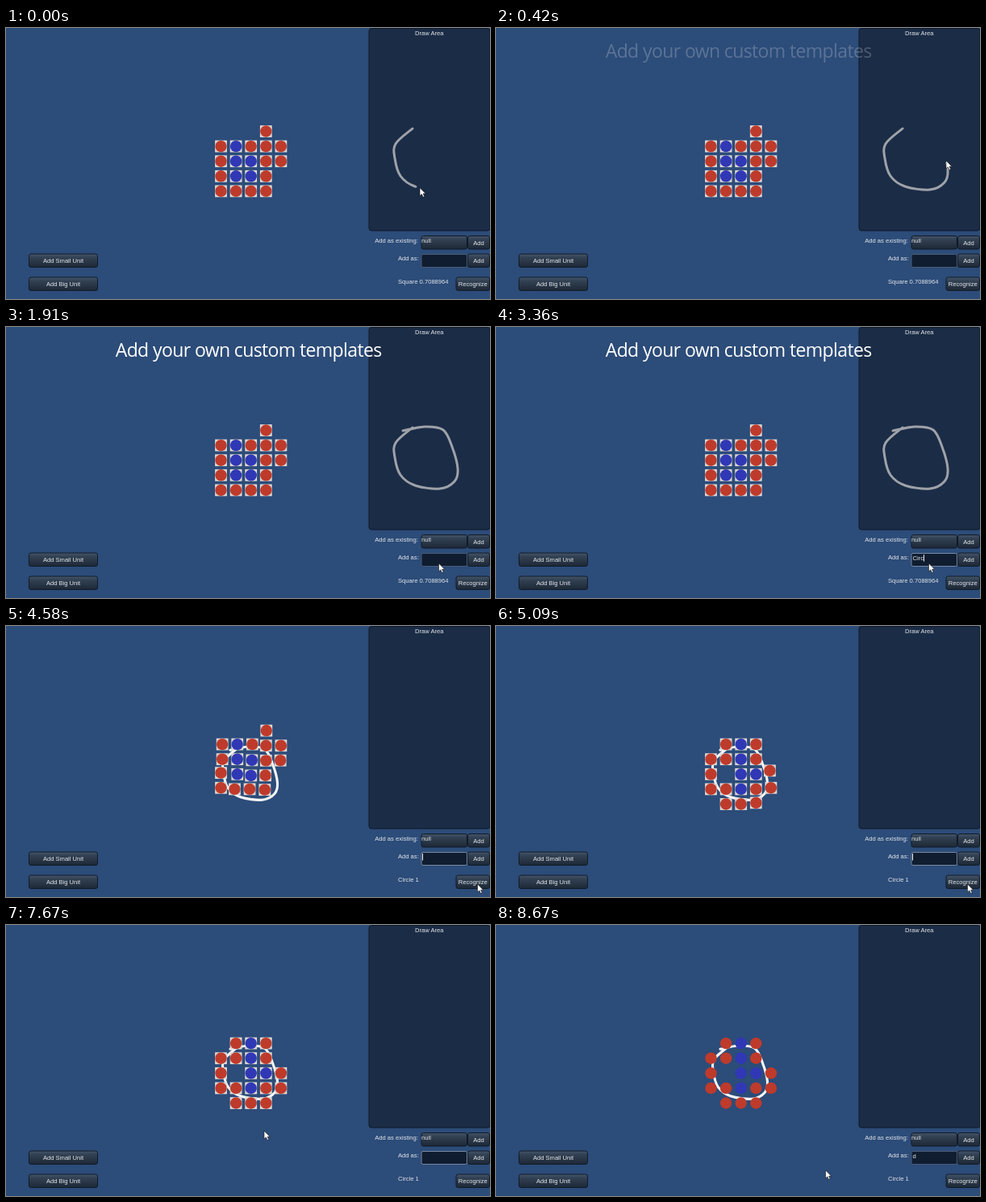
An HTML page that plays this animation: 600x337 px, repeating every 8730 ms.

```html
<!DOCTYPE html>
<html lang="en">
<head>
<meta charset="utf-8">
<title>Custom templates</title>
<style>
  html, body { margin: 0; height: 100%; overflow: hidden; background: #2c4c79; }
  svg { display: block; width: 100vw; height: 100vh; }
  text { font: 7.6px "Liberation Sans", Arial, sans-serif; fill: #e2e5e9; white-space: pre; }
  .mid { text-anchor: middle; }
  #title { font: 23px "Open Sans", "Noto Sans", sans-serif; letter-spacing: -.61px; fill: #fff; }
  .stroke { fill: none; stroke-width: 3; stroke-linecap: round; stroke-linejoin: round; }
</style>
</head>
<body>
<svg id="stage" viewBox="0 0 600 337">
  <defs>
    <linearGradient id="face" x2="0" y2="1">
      <stop offset="0" stop-color="#46566a"/>
      <stop offset=".25" stop-color="#334254"/>
      <stop offset="1" stop-color="#1d2836"/>
    </linearGradient>
  </defs>
  <rect width="600" height="337" fill="#2c4c79"/>
  <rect x="450" y=".5" width="150" height="251.5" rx="3" fill="#1b2c46" stroke="#0e1828"/>
  <text class="mid" x="524.7" y="9.4">Draw Area</text>
  <g id="buttons"></g>
  <text x="457.2" y="266.8">Add as existing:</text>
  <text x="515" y="266.7">null</text>
  <text x="486" y="289.3">Add as:</text>
  <rect id="field" x="515" y="281.5" width="56.5" height="16" rx="2" fill="#101d31"/>
  <text id="entry" x="516.5" y="289.7"></text>
  <rect id="caret" y="283" width="1" height="8.5" fill="#e4e8ee"/>
  <text id="status" x="486" y="318"></text>
  <path id="ink" class="stroke" stroke="#9ea2a9"/>
  <path id="shape" class="stroke" stroke="#f6f6f6" transform="translate(302.5 183.5) scale(.86) translate(-520.5 -163)" style="stroke-width:3.6"/>
  <g id="units"></g>
  <text id="title" x="135.7" y="37.2">Add your own custom templates</text>
  <path id="cursor" d="M0 0V10L2.3 7.9L4 11.6L5.7 10.8L4.1 7.3H7.2Z" fill="#fff" stroke="#111" stroke-width=".6"/>
</svg>
<script>
const LOOP = 8730, INK_END = 943, ADDED = 4120, RECOGNIZED = 4500;
const MOVE_START = 4565, SPEED = 0.103, BLINK = 970;
const $ = id => document.getElementById(id);
const clamp = v => Math.max(0, Math.min(1, v));
const ramp = (t, a, b) => clamp((t - a) / (b - a));
const smooth = k => k * k * (3 - 2 * k);
const mix = (a, b, k) => a.map((v, i) => v + (b[i] - v) * k);
const show = (el, on) => { el.style.display = on ? '' : 'none'; };

function add(parent, tag, attrs, text = '') {
  const el = document.createElementNS('http://www.w3.org/2000/svg', tag);
  for (const k in attrs) el.setAttribute(k, attrs[k]);
  el.textContent = text;
  return parent.appendChild(el);
}

function button(x, y, w, label) {
  const box = { x, y, width: w, height: 16.5, rx: 2.5, fill: 'url(#face)', stroke: '#101a28' };
  add($('buttons'), 'rect', box);
  add($('buttons'), 'text', { class: 'mid', x: x + w / 2, y: y + 11.2 }, label);
}
button(28.5, 281, 85, 'Add Small Unit');
button(28.5, 310, 85, 'Add Big Unit');
button(515, 258.5, 56.5, '');
button(572.5, 258.5, 27, 'Add');
button(572.5, 281, 27, 'Add');
button(558, 310, 41.5, 'Recognize');

// Hand-drawn loop through a few points, Catmull-Rom smoothed
const loopPts = [[504, 125], [483, 144], [482, 162], [489, 184], [507, 197], [538, 201],
  [556, 192], [560, 176], [553, 149], [542, 128], [519, 124], [492, 129]];

function curve(p) {
  const at = i => p[Math.max(0, Math.min(p.length - 1, i))];
  const ctrl = (a, b, c, s) => a.map((v, i) => (v + s * (c[i] - b[i]) / 6).toFixed(2));
  let d = 'M' + p[0];
  for (let i = 0; i < p.length - 1; i++) {
    const a = at(i), b = at(i + 1);
    d += `C${ctrl(a, at(i - 1), b, 1)} ${ctrl(b, a, at(i + 2), -1)} ${b}`;
  }
  return d;
}
for (const id of ['ink', 'shape']) $(id).setAttribute('d', curve(loopPts));
const inkLen = $('ink').getTotalLength();
const inkPart = t => 0.353 + 0.647 * ramp(t, 0, INK_END);

// Formation maps: one letter per unit, capitals are blue
const before = ['...a.', 'bCdef', 'gHIjk', 'lMNo.', 'pqrs.'];
const after = ['.....', '.bCd.', 'lgHe.', 'p.MIa', 'qrNkf', '.soj.'];

function place(map, id) {
  const row = map.findIndex(line => line.includes(id));
  return [266.5 + 18.6 * map[row].indexOf(id), 128.5 + 18.6 * row];
}
const units = [...before.join('').replaceAll('.', '')].map(id => {
  const g = add($('units'), 'g', {});
  const tile = add(g, 'rect', { x: -7.4, y: -7.4, width: 14.8, height: 14.8, fill: '#dfd8d4' });
  add(g, 'circle', { r: 7.2, fill: id < 'a' ? '#3038b6' : '#be3b2c' });
  return { g, tile, from: place(before, id), to: place(after, id) };
});

// Pointer trips after drawing: start, end, destination
const trips = [
  [INK_END, 1730, [536.5, 294]],
  [3880, 4060, [585, 289]],
  [4180, 4400, [584.5, 321]],
  [5330, 6210, [313, 300]],
  [6610, 7120, [320, 256]],
  [7670, 8640, [408.5, 305]],
];

function pointer(t) {
  const lead = 0.02 * (1 - ramp(t, 0, INK_END));
  const tip = $('ink').getPointAtLength(inkLen * (inkPart(t) + lead));
  return trips.reduce((pos, [a, b, to]) => mix(pos, to, smooth(ramp(t, a, b))), [tip.x, tip.y]);
}

function typed(t) {
  if (t >= ADDED) return t < 7900 ? '' : 'd';
  const rest = Math.max(0, Math.floor((t - 2820) / 150));
  return t < 2420 ? '' : 'Circle'.slice(0, 1 + rest);
}

function caretOn(t) {
  const phase = Math.floor(Math.max(0, t - 4450) / BLINK);
  return t >= 2330 && t < 8120 && phase % 2 === 0;
}

function draw(t) {
  const done = t >= RECOGNIZED;
  show($('ink'), !done);
  show($('shape'), done);
  $('ink').setAttribute('stroke-dasharray', `${inkLen * inkPart(t)} ${inkLen * 2}`);
  $('status').textContent = done ? 'Circle 1' : 'Square 0.7088964';

  const moved = Math.max(0, t - MOVE_START) * SPEED;
  for (const { g, tile, from, to } of units) {
    const dist = Math.hypot(to[0] - from[0], to[1] - from[1]);
    g.setAttribute('transform', `translate(${mix(from, to, clamp(moved / dist))})`);
    show(tile, t < 8500);
  }

  const entry = $('entry');
  entry.textContent = typed(t);
  show($('caret'), caretOn(t));
  $('caret').setAttribute('x', 516 + (entry.textContent ? entry.getComputedTextLength() + 0.5 : 0));
  $('field').setAttribute('stroke', t >= 2180 && t < 8120 ? '#7988a0' : '#4a5b74');

  $('title').style.opacity = smooth(ramp(t, 300, 700)) * (1 - ramp(t, 3400, 3640));
  $('cursor').setAttribute('transform', `translate(${pointer(t)})`);
}

const begin = performance.now();
function tick() {
  draw((performance.now() - begin) % LOOP);
  requestAnimationFrame(tick);
}
tick();
</script>
</body>
</html>
```
